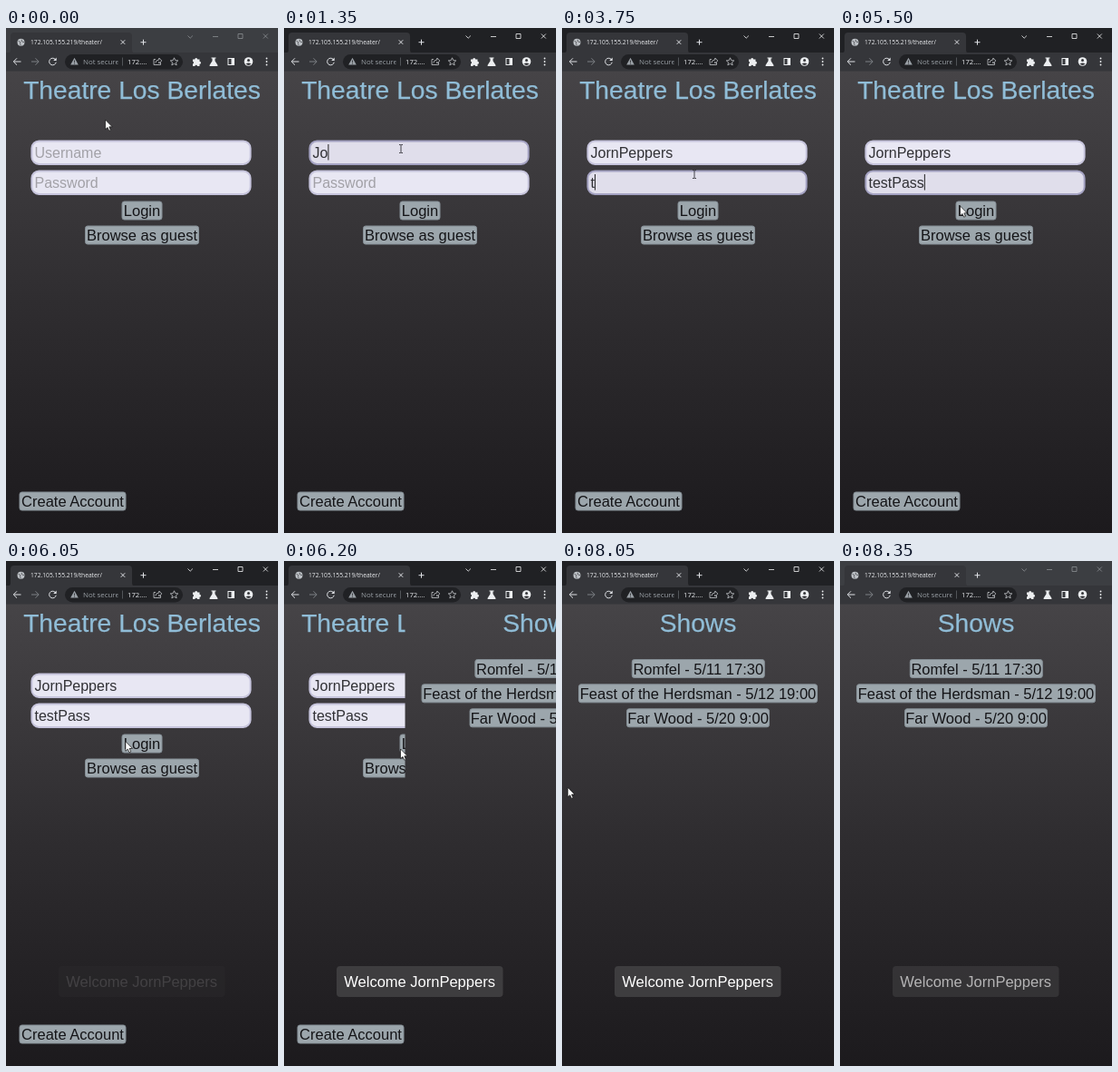
Recreate the animation shown at these times as an HTML page. Size 300 by 556 pixels, loop 8400 ms.

```html
<!DOCTYPE html>
<html lang="en">
<head>
<meta charset="utf-8">
<title>Theater login</title>
<style>
html, body { margin: 0; width: 100%; height: 100%; overflow: hidden; background: #1c1a1d; }
svg { display: block; width: 100vw; height: 100vh; }
text { font-family: "Liberation Sans", Arial, sans-serif; white-space: pre; }
.ui text { font: 6.7px "Open Sans", "Noto Sans", sans-serif; }
.line { fill: none; stroke: #dfe1e5; stroke-width: 1; }
.thin { fill: none; stroke-width: .8; }
.title { font-size: 28.2px; fill: #90bdd7; stroke: #90bdd7; stroke-width: .25; text-anchor: middle; }
.field { stroke-width: 2; }
.value { font-size: 16px; }
.btn rect { fill: #9ca6ac; stroke: #858f96; }
.btn text { font-size: 16.5px; fill: #141417; text-anchor: middle; }
</style>
</head>
<body>
<svg id="stage" viewBox="0 0 300 556" preserveAspectRatio="none">
  <defs>
    <linearGradient id="bg" gradientUnits="userSpaceOnUse" x1="0" y1="47" x2="0" y2="556">
      <stop offset="0" stop-color="#464447"/>
      <stop offset=".5" stop-color="#2f2d30"/>
      <stop offset="1" stop-color="#1c1a1d"/>
    </linearGradient>
  </defs>

  <g id="login">
    <rect y="47" width="300" height="509" fill="url(#bg)"/>
    <text class="title" x="150" y="78">Theatre Los Berlates</text>
  </g>
  <g id="shows">
    <rect y="47" width="300" height="509" fill="url(#bg)"/>
    <text class="title" x="150" y="78">Shows</text>
  </g>
  <g id="toast">
    <rect x="58" y="446" width="183.500" height="34" rx="4" fill="#3e3d3f"/>
    <text x="149.600" y="469" text-anchor="middle" font-size="16.5" fill="#fff">Welcome JornPeppers</text>
  </g>

  <g class="ui">
    <rect id="frame" width="300" height="28"/>
    <path d="M1 28Q5 28 5 24V9Q5 5 9 5H135Q139 5 139 9V24Q139 28 143 28Z" fill="#35363a"/>
    <rect y="27" width="300" height="20.500" fill="#35363a"/>
    <circle cx="16.500" cy="15.700" r="4" fill="#bdc1c6"/>
    <path d="M13.500 14.200l2.500 1.500-.5 2 1 1.500M17.500 12.700l-.5 1.500 2 1.500 1-.5" class="thin" stroke="#4a4c50"/>
    <text x="27" y="18" fill="#e8eaed">172.105.155.219/theater/</text>
    <path class="line" d="M126.700 13.300l4.500 4.500m0-4.500l-4.500 4.500"/>
    <path class="line" d="M148.500 15.700h6m-3-3v6"/>
    <g id="controls" class="thin">
      <path d="M200.500 8.500l2.700 2.700 2.700-2.700"/>
      <path d="M228 9.500h6M256 6.500h5v5h-5zM283.800 6.500l5 5m0-5l-5 5"/>
    </g>

    <path class="line" d="M16.500 37h-8m3.500-3.700L8.300 37l3.700 3.700"/>
    <path class="line" d="M28 37h8m-3.500-3.700l3.700 3.700-3.700 3.700" style="stroke:#7d8085"/>
    <path class="line" d="M54.300 34.500a3.800 3.800 0 1 0 .9 3.200"/>
    <path d="M55.700 32.500v3.500h-3.500z" fill="#dfe1e5"/>
    <rect x="65" y="29" width="130" height="16.500" rx="8.250" fill="#202124"/>
    <path d="M75.500 32.800l4.300 7.700h-8.600z" fill="#9aa0a6"/>
    <path d="M75.500 35.500v2.300m0 .8v1" class="thin" stroke="#202124"/>
    <svg x="84" y="29" width="39.500" height="17"><text x="1" y="10.800" style="font-size:7.900px" fill="#9aa0a6">Not secure</text></svg>
    <path d="M128.500 32.500v9" class="thin" stroke="#5f6368"/>
    <text x="134" y="39.800" style="font-size:7.700px" fill="#e8eaed">172....</text>
    <g class="thin" stroke="#c4c7cb">
      <path d="M165 34.500h-2v6h7.500v-2.500M164.800 38.500q.5-3.500 4-3.500v-2l3 3-3 3v-2"/>
      <path d="M185.500 32.800l1.250 2.800 3 .3-2.300 2 .7 3-2.650-1.600-2.650 1.600.7-3-2.300-2 3-.3z"/>
    </g>
    <g fill="#eceef0">
      <path d="M206 34.500h2.200a1.500 1.500 0 1 1 3 0h2.300v2.300a1.500 1.500 0 1 1 0 3v2.200h-2.500a1.300 1.300 0 0 0-2.600 0H206v-2.500a1.400 1.400 0 0 0 0-2.700z"/>
      <path d="M226.500 32.500h5v1h-1v2.800l3 4.700q.3 1-.7 1h-7.600q-1 0-.7-1l3-4.700v-2.800h-1z"/>
      <path d="M244.500 33h7.500v8h-7.500zm1 1v6h3v-6z" fill-rule="evenodd"/>
      <circle cx="267.500" cy="37" r="4.800"/>
      <circle cx="287.500" cy="33.500" r=".9"/><circle cx="287.500" cy="37" r=".9"/><circle cx="287.500" cy="40.500" r=".9"/>
    </g>
    <circle cx="267.500" cy="35.500" r="1.500" fill="#35363a"/>
    <path d="M264.500 39.800q3-2.800 6 0-3 2.300-6 0" fill="#35363a"/>
  </g>

  <path id="arrow" d="M-.5 0V10.600L2 8.500 3.700 12.200 5.400 11.400 3.800 7.800H7.200Z" fill="#fff" stroke="#111" stroke-width=".7"/>
  <path id="beam" d="M-2-4.500h1.500l.5.500.5-.5H2M0-4V4M-2 4.500h1.500l.5-.5.5.5H2" fill="none" stroke="#333338" stroke-width=".9"/>
</svg>
<script>
const LOOP = 8400;
const $ = id => document.getElementById(id);

function add(parent, tag, attrs, content = "") {
  const el = document.createElementNS("http://www.w3.org/2000/svg", tag);
  for (const k in attrs) el.setAttribute(k, attrs[k]);
  el.textContent = content;
  return parent.appendChild(el);
}

function button(page, label, cx, top, width) {
  const g = add(page, "g", { class: "btn" });
  add(g, "rect", { x: cx - width / 2 + .5, y: top + .5, width: width - 1, height: 20, rx: 2.5 });
  add(g, "text", { x: cx, y: top + 16.5 }, label);
}

function field(top, hint, focus, blur, keys) {
  const box = add($("login"), "rect", { class: "field", x: 28.4, y: top + 1.4, width: 241.2, height: 25.5, rx: 8 });
  const text = add($("login"), "text", { class: "value", x: 31.5, y: top + 19.7 });
  const caret = add($("login"), "rect", { y: top + 5, width: 1, height: 17.5, fill: "#222" });
  return { top, hint, focus, blur, keys, box, text, caret };
}

// Each key press: time, character ("<" deletes the last one)
const fields = [
  field(123, "Username", 450, 3600, [[1150, "J"], [1350, "o"], [1400, "r"], [1550, "n"], [1700, "P"],
    [1900, "p"], [2000, "e"], [2250, "<"], [2300, "<"], [2400, "e"],
    [2550, "p"], [2600, "p"], [2750, "e"], [2800, "r"], [2950, "s"]]),
  field(156, "Password", 3600, 5900, [[3750, "t"], [3900, "e"], [4100, "s"], [4150, "t"],
    [4500, "P"], [4750, "a"], [4950, "s"], [5100, "s"]])
];

button($("login"), "Login", 150, 190.5, 45);
button($("login"), "Browse as guest", 150, 217.5, 126);
button($("login"), "Create Account", 73.5, 510.5, 118);
button($("shows"), "Romfel - 5/11 17:30", 150.3, 108, 147);
button($("shows"), "Feast of the Herdsman - 5/12 19:00", 150, 135.3, 264);
button($("shows"), "Far Wood - 5/20 9:00", 150, 162.3, 158);

// Mouse: time, x, y
const track = [
  [0, 110, 101], [50, 110, 101], [300, 125, 124], [500, 129, 133],
  [3100, 129, 133], [3300, 138, 70], [3550, 146, 161],
  [5200, 146, 161], [5350, 158, 184], [5500, 133, 196], [5700, 133, 197],
  [6000, 133, 197], [6200, 129, 207], [6350, 63.5, 225], [6600, 16, 251],
  [6850, 16, 251], [6950, 12, 251], [8000, 12, 251], [8200, -20, 240], [LOOP, -20, 240]
];

const clamp = v => Math.max(0, Math.min(1, v));
const smooth = v => v * v * (3 - 2 * v);

function mouseAt(t) {
  const i = track.findIndex(p => p[0] > t);
  const [t0, x0, y0] = track[i - 1], [t1, x1, y1] = track[i];
  const k = smooth((t - t0) / (t1 - t0));
  return [x0 + (x1 - x0) * k, y0 + (y1 - y0) * k];
}

function drawField(f, t) {
  const focused = t >= f.focus && t < f.blur;
  let value = "", last = f.focus;
  for (const [at, key] of f.keys) {
    if (at > t) break;
    value = key === "<" ? value.slice(0, -1) : value + key;
    last = at;
  }
  f.box.setAttribute("fill", focused ? "#e0deeb" : "#e8e7f3");
  f.box.setAttribute("stroke", focused ? "#a4a2c2" : "#c6c4dc");
  f.text.setAttribute("fill", value ? "#313135" : "#a2a1a7");
  const shown = value || f.hint;
  if (f.text.textContent !== shown) f.text.textContent = shown;
  const on = focused && Math.floor((t - last) / 500) % 2 === 0;
  f.caret.setAttribute("visibility", on ? "visible" : "hidden");
  f.caret.setAttribute("x", 31.5 + (value ? f.text.getComputedTextLength() : 0));
}

function draw(t) {
  fields.forEach(f => drawField(f, t));
  const active = t >= 450 && t < 8300;
  $("frame").setAttribute("fill", active ? "#202124" : "#3c3e42");
  $("controls").setAttribute("stroke", active ? "#f1f3f4" : "#8b8e92");

  const slide = smooth(clamp((t - 6040) / 300));
  $("shows").setAttribute("transform", `translate(${300 * (1 - slide)} 0)`);
  $("toast").setAttribute("opacity", clamp((t - 6030) / 150) * (1 - clamp((t - 8250) / 300)));

  const [x, y] = mouseAt(t);
  const typing = t < 6040 && x > 27 && x < 270 && fields.some(f => y > f.top && y < f.top + 27.5);
  for (const [id, show] of [["arrow", !typing], ["beam", typing]]) {
    $(id).setAttribute("transform", `translate(${x} ${y})`);
    $(id).setAttribute("visibility", show ? "visible" : "hidden");
  }
}

const start = performance.now();
function tick() {
  draw((performance.now() - start) % LOOP);
  requestAnimationFrame(tick);
}
tick();
</script>
</body>
</html>
```
